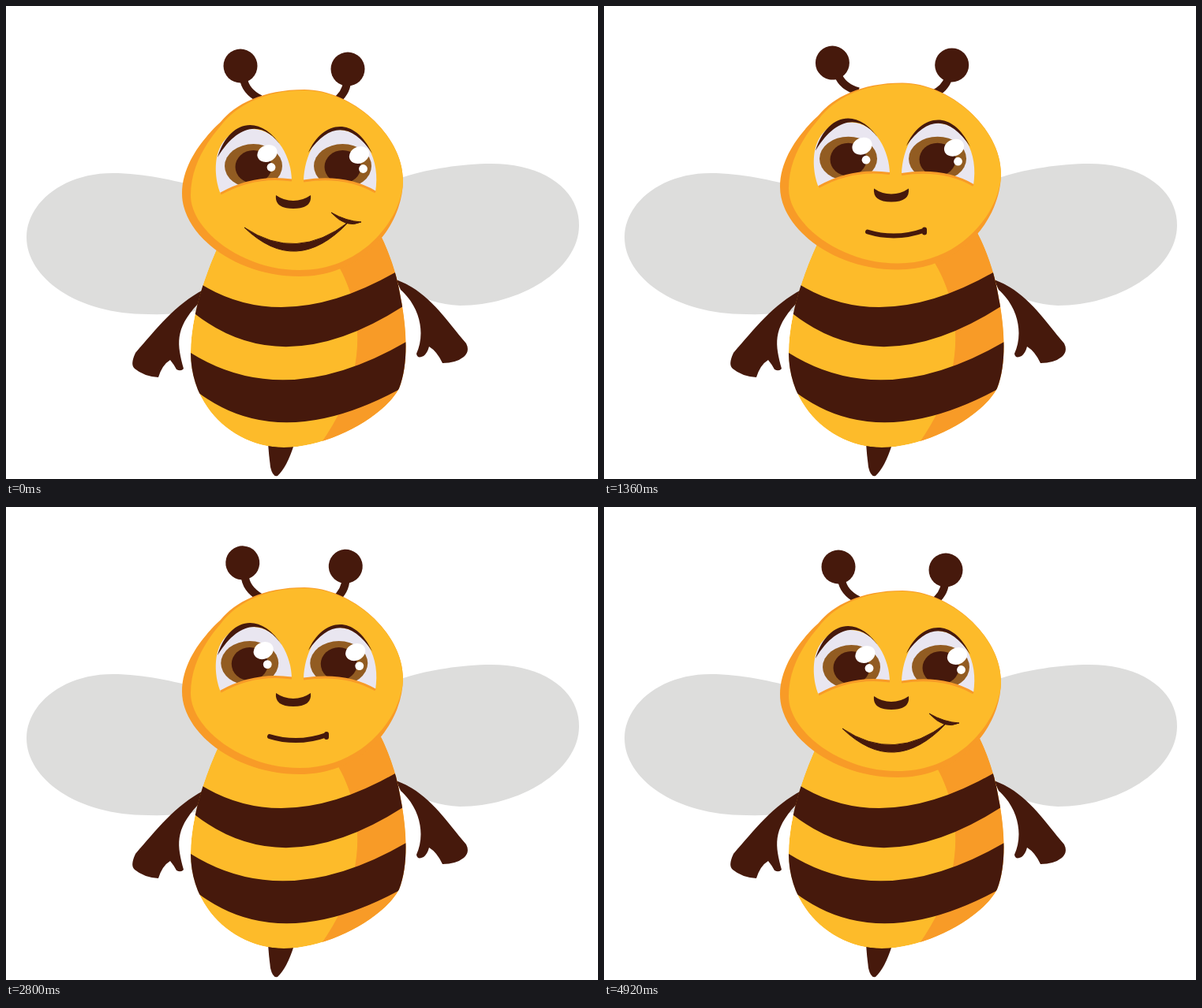
Write an HTML page that moves like this. It is 750 by 600 pixels and loops after 5000 ms.

```html
<!DOCTYPE html>
<html lang="en">
<head>
<meta charset="utf-8">
<title>Bee</title>
<style>
  html, body { margin: 0; width: 100%; height: 100%; overflow: hidden; background: #fff; }
  svg { display: block; width: 100vw; height: 100vh; }
  .dark { fill: #46190c; }
  .yellow { fill: #fdbb2a; }
  .orange { fill: #f89b27; }
  .wing { fill: #dddddc; }
  .iris { fill: #925c22; }
  .white { fill: #fff; }
  .sclera { fill: #e9e6f0; }
  .stalk { fill: none; stroke: #46190c; stroke-width: 10; }
  .cheek { fill: none; stroke: #f89b27; stroke-width: 3; }
  #mouth { stroke: #46190c; stroke-linejoin: round; }
</style>
</head>
<body>
<svg viewBox="0 0 750 600">
  <defs>
    <path id="bodyShape" d="M278 285C248 345 234 400 234 440C234 510 290 560 352 560C410 560 480 520 498 485C510 455 508 410 500 370C495 335 480 300 472 286L290 270Z"/>
    <path id="leftEyeShape" d="M272 238C262 215 258 156 312 156C345 156 362 195 362 221Q315 214 272 238Z"/>
    <path id="rightEyeShape" d="M377 222C378 190 394 157 420 157C455 157 475 195 468 236Q430 214 377 222Z"/>
    <clipPath id="bodyClip"><use href="#bodyShape"/></clipPath>
    <clipPath id="leftEyeClip"><use href="#leftEyeShape"/></clipPath>
    <clipPath id="rightEyeClip"><use href="#rightEyeShape"/></clipPath>
    <g id="iris">
      <ellipse class="iris" rx="36.5" ry="28"/>
      <ellipse class="dark" cy="1" rx="23" ry="21"/>
    </g>
    <g id="glint" class="white">
      <ellipse rx="13" ry="10.5" transform="rotate(-25)"/>
      <circle r="5.4" cx="5" cy="17.5"/>
    </g>
  </defs>

  <g class="wing">
    <path d="M240 228C215 222 175 212 135 212C70 212 26 252 26 293C26 345 90 391 180 391Q220 392 245 386L290 300Z"/>
    <path d="M495 220C520 210 570 200 615 200C680 200 726 232 726 278C726 335 650 380 575 380Q530 378 498 352L470 290Z"/>
  </g>

  <g class="dark">
    <path d="M332 555L365 556Q356 585 344 596Q338 598 335 585Q333 570 332 555Z"/>
    <path d="M250 360C215 378 190 410 164 440Q157 455 163 460Q175 470 193 471Q198 455 208 449Q213 455 216 461Q222 464 225 460C217 430 213 410 243 378Z"/>
    <path d="M494 347C535 362 555 395 583 428Q588 438 580 445Q570 453 553 453Q546 438 536 432Q534 440 529 444Q521 448 520 441C530 420 528 385 500 360Z"/>
  </g>

  <g clip-path="url(#bodyClip)">
    <use href="#bodyShape" class="yellow"/>
    <path class="orange" d="M412 315C457 380 460 470 398 556L520 560V280H412Z"/>
    <g class="dark">
      <path d="M230 343L249 354Q354 417 493 338L515 325L520 372L503 381Q352 478 240 391L225 384Z"/>
      <path d="M225 435L234 440Q354 515 507 426L520 418V475L497 487Q346 568 243 490L225 480Z"/>
    </g>
  </g>

  <g id="head">
    <g id="leftAntenna">
      <path class="stalk" d="M301 92Q303 108 322 118"/>
      <circle class="dark" cx="297" cy="76" r="21.5"/>
    </g>
    <g id="rightAntenna">
      <path class="stalk" d="M432 96Q431 111 416 122"/>
      <circle class="dark" cx="433" cy="80" r="21.5"/>
    </g>
    <path class="orange" d="M378 106C437 106 503 163 503 221C503 276 455 343 372 343C290 343 223 290 223 238C223 195 258 160 272 147C290 125 325 106 378 106Z"/>
    <path class="yellow" d="M378 107C437 107 503 163 503 221C503 266 455 335 372 335C300 335 234 285 234 240C234 205 252 175 272 152C290 128 325 107 378 107Z"/>

    <use href="#leftEyeShape" class="sclera"/>
    <use href="#rightEyeShape" class="sclera"/>
    <g clip-path="url(#leftEyeClip)"><g class="gaze"><use href="#iris" x="313.5" y="203"/></g></g>
    <g clip-path="url(#rightEyeClip)"><g class="gaze"><use href="#iris" x="426.5" y="203"/></g></g>
    <g class="gaze">
      <use href="#glint" x="331" y="187"/>
      <use href="#glint" x="447.5" y="189"/>
    </g>
    <path class="cheek" d="M272 238Q315 214 362 221M377 222Q430 214 468 236"/>
    <g class="dark">
      <path d="M268 192C282 145 322 135 350 180C328 146 296 146 268 192Z"/>
      <path d="M383 186C400 147 440 137 464 187C438 148 410 147 383 186Z"/>
      <path d="M342 240Q352 247 364 247Q376 247 386 240Q388 257 364 257Q340 257 342 240Z"/>
      <path id="mouth"/>
    </g>
  </g>
</svg>
<script>
const LOOP = 5000;
const $ = id => document.getElementById(id);
const gazeParts = document.querySelectorAll('.gaze');

const mix = (a, b, u) => a + (b - a) * u;

function ease(t, from, to) {
  const u = Math.min(1, Math.max(0, (t - from) / (to - from)));
  return u * u * (3 - 2 * u);
}

// Rises from 0 to 1 over a..b and falls back over c..d.
const pulse = (t, a, b, c, d) => ease(t, a, b) - ease(t, c, d);

// A sickle hanging between two points, with a sag for each edge.
function sickle(x0, y0, x1, y1, upper, lower) {
  const x = (x0 + x1) / 2, y = (y0 + y1) / 2;
  return `M${x0} ${y0}Q${x} ${y + lower} ${x1} ${y1}Q${x} ${y + upper} ${x0} ${y0}Z`;
}

function drawMouth(calm) {
  const m = (smiling, flat) => mix(smiling, flat, calm);
  const lip = sickle(m(302, 334), m(281, 295), m(434, 406), m(274, 293), m(48, 12), m(67, 12));
  const dimple = sickle(m(412, 406), m(262, 292), m(450, 406), m(274, 296), m(5, 0), m(15, 0));
  $('mouth').setAttribute('d', lip + dimple);
  $('mouth').setAttribute('stroke-width', m(1, 6));
}

function draw() {
  const t = performance.now() % LOOP;
  const lift = pulse(t, 0, 1200, 1400, 2300) + pulse(t, 2350, 3300, 3400, 4150);
  const dip = pulse(t, 1400, 2600, 2600, 3300) + pulse(t, 3400, 4150, 4200, 4900);
  const look = pulse(t, 300, 1800, 2600, 4100);
  const angle = 11.5 * (lift - dip);
  const move = (el, value) => el.setAttribute('transform', value);

  move($('head'), `translate(0 ${-8.5 * lift})`);
  move($('leftAntenna'), `rotate(${-angle} 316 116)`);
  move($('rightAntenna'), `rotate(${angle} 420 120)`);
  gazeParts.forEach(part => move(part, `translate(${-5 * look} ${-look})`));
  drawMouth(pulse(t, 600, 1200, 3500, 4100));
  requestAnimationFrame(draw);
}
draw();
</script>
</body>
</html>
```
